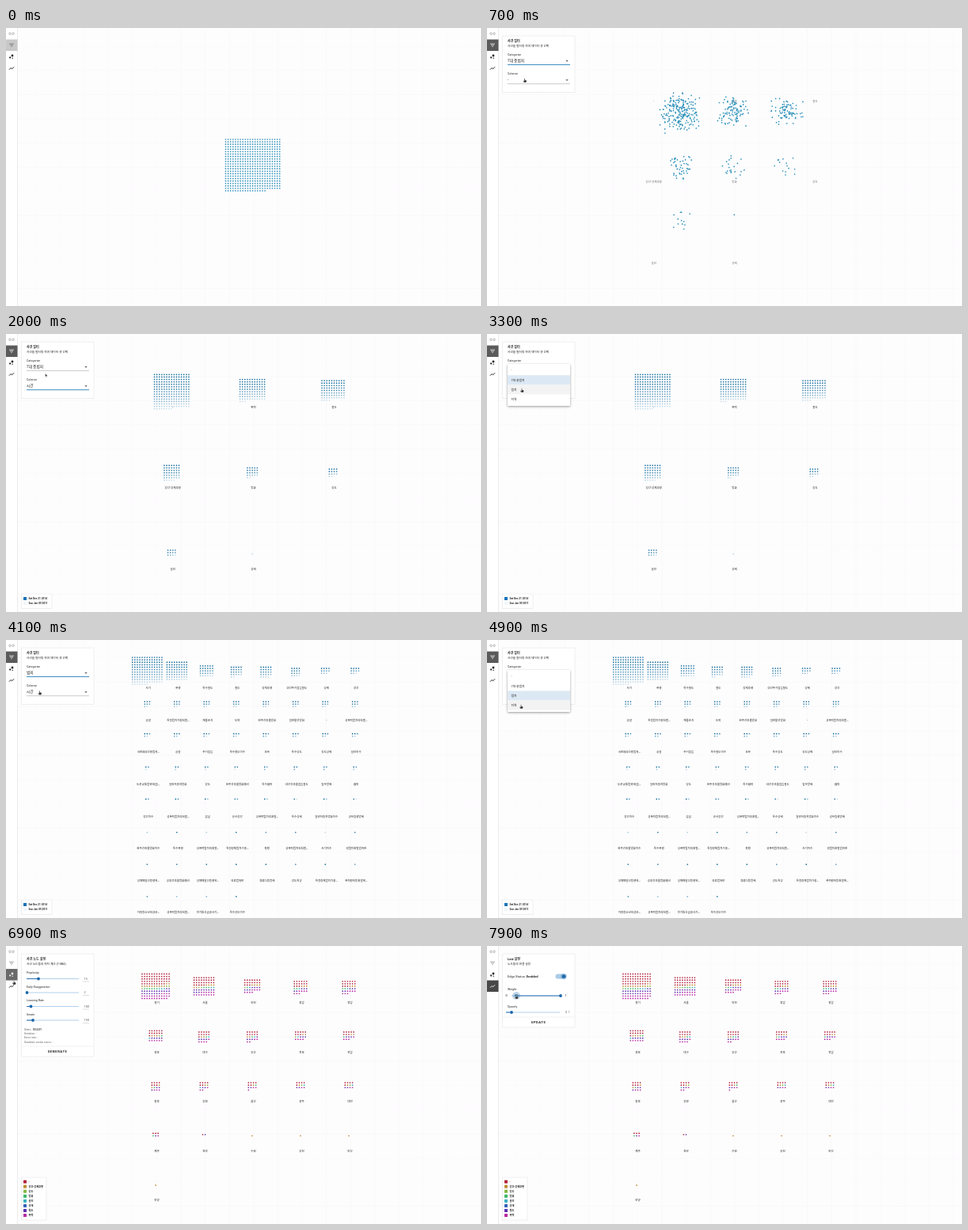
Recreate the animation shown at these times as an HTML page. Size 600x352 px, loop 8 s.

```html
<!DOCTYPE html>
<html lang="ko">
<head>
<meta charset="utf-8">
<style>
html, body { margin: 0; width: 100%; height: 100%; overflow: hidden; background: #fefdfe; }
svg { display: block; width: 600px; height: 352px; font-family: Roboto, 'Noto Sans CJK KR', 'Noto Sans CJK', sans-serif; }
.menu { filter: drop-shadow(0 1px 1.5px rgba(0,0,0,.4)); }
</style>
</head>
<body>
<svg id="stage" viewBox="0 0 600 352">
  <g id="grid" stroke="#f9f8fa" stroke-width=".7"></g>
  <g id="labels"></g>
  <g id="dots"></g>
  <g id="ui"></g>
  <g id="cursor" stroke="#fff" stroke-width=".35" fill="#333">
    <path id="arrow" d="M0 0V4.2L1 3.3 1.7 4.8 2.5 4.4 1.8 3 3.1 2.9Z"/>
    <path id="hand" d="M-.5 0Q0-.6.5 0V1.7L2.4 2.2Q2.8 3.8 1.9 5H-.8L-2 3Q-1.6 2.2-.5 3Z"/>
  </g>
</svg>
<script>
const LOOP = 8000, STEP = 3.1, BLUE = '#1c68ac', MAJOR = '7대 중범죄';
const $ = id => document.getElementById(id);
const clamp = v => Math.max(0, Math.min(1, v));
const ease = k => k < .5 ? 4 * k ** 3 : 1 - (2 - 2 * k) ** 3 / 2;
const mix = (a, b, k) => a + (b - a) * k;
const latest = (list, t) => list.reduce((found, e) => e[0] <= t ? e : found);
const rgb = hex => [1, 3, 5].map(i => parseInt(hex.slice(i, i + 2), 16));

function random(seed) {
  return () => (seed = (seed * 48271) % 2147483647) / 2147483647;
}

// --- markup helpers ---
const text = (x, y, s, size = 3.7, attrs = '') =>
  `<text x="${x}" y="${y + size * .36}" font-size="${size}" fill="#222" ${attrs}>${s}</text>`;
const rect = (x, y, w, h, fill, attrs = '') =>
  `<rect x="${x}" y="${y}" width="${w}" height="${h}" fill="${fill}" ${attrs}/>`;
const line = (x1, x2, y, color, width = .5) =>
  `<path d="M${x1} ${y}H${x2}" stroke="${color}" stroke-width="${width}"/>`;
const circle = (x, y, r, fill, attrs = '') =>
  `<circle cx="${x}" cy="${y}" r="${r}" fill="${fill}" ${attrs}/>`;
const BOLD = 'font-weight="700"', MIDDLE = 'text-anchor="middle"', GREY = 'style="fill:#666"';
const card = (y, h, w = 91.5) => rect(19.5, y, w, h, '#fff', 'stroke="#e8e8ea" stroke-width=".7"');

// --- cluster layouts ---
const HUES = ['#b3243c', '#bd8a35', '#84b640', '#3bb765', '#35afc0', '#3560b8', '#5f30b0', '#b52aa2'];
const HUE_NAMES = ['-', '강간·강제추행', '강도', '방화', '살인', '상해', '절도', '폭력'];
const HUE_SHARES = [.44, .534, .56, .602, .626, .628, .796, 1];
const MAJOR_ORDER = [0, 7, 6, 1, 3, 2, 4, 5];

const crimes = `사기,폭행,특수절도,절도,강제추행,야간주거침입절도,상해,강간
공갈,특정범죄가중처벌…,재물손괴,도박,현주건조물방화,일반물건방화,-,성폭력범죄의처벌…
국민체육진흥법위…,공갈,주거침입,특수절도미수,모욕,특수강도,강도상해,살인미수
도로교통법위반(음…,일반자동차방화,강도,현주건조물방화예비,특수협박,야간건조물침입절도,업무방해,협박
강간미수,성폭력범죄의처벌…,감금,유사강간,성폭력범죄의처벌…,특수상해,일반자동차방화미수,공무집행방해
현주건조물방화미수,특수폭행,성폭력범죄의처벌…,특정경제범죄가중…,횡령,성폭력범죄의처벌…,사기미수,경범죄처벌법위반
성매매알선등행위…,공용건조물방화예비,성매매알선등행위…,의료법위반,장례식등방해,강도치상,특정경제범죄가중…,폭력행위등처벌에…
아동청소년의성보…,성폭력범죄의처벌…,전기통신금융사기…,특수강도미수`.split(/[,\n]/);
const crimeCounts = crimes.map((_, i) =>
  i < 8 ? [150, 72, 30, 22, 24, 16, 11, 11][i] : [8, 5, 3, 2, 1, 1, 1][(i >> 3) - 1]);

const regionHead = '경기 서울 인천 충남 경남 경북 대구 부산 ';
const regionsByTime = (regionHead + '전남 전북 충북 강원 울산 대전 광주 제주 천안 부천 안산 수원 안양').split(' ');
const regionsByCrime = (regionHead + '전북 전남 충북 강원 울산 광주 대전 제주 천안 수원 부천 안산 안양').split(' ');
const regionCounts = [131, 72, 39, 33, 33, 30, 24, 22, 19, 18, 16, 14, 13, 12, 12, 6, 2, 1, 1, 1, 1];

function layout(counts, cols, x0, dx, y0, dy, seed) {
  const rnd = random(seed), slots = [];
  const centers = counts.map((_, i) => [x0 + i % cols * dx, y0 + Math.floor(i / cols) * dy]);
  counts.forEach((n, group) => {
    const side = Math.ceil(Math.sqrt(n)), [cx, cy] = centers[group];
    for (let j = 0; j < n; j++) slots.push({
      x: cx + (j % side - (side - 1) / 2) * STEP,
      y: cy + (Math.floor(j / side) - (side - 1) / 2) * STEP,
      group, rank: (j + .5) / n, age: (j + rnd()) / n
    });
  });
  for (let i = slots.length - 1; i > 0; i--) {
    const j = Math.floor(rnd() * (i + 1));
    [slots[i], slots[j]] = [slots[j], slots[i]];
  }
  return { slots, centers };
}

const whole = layout([500], 1, 311.6, 0, 175.1, 0, 11);
const major = layout([218, 102, 84, 47, 22, 14, 12, 1], 3, 209.2, 101.9, 73, 102.7, 23);
const crime = layout(crimeCounts, 8, 178.3, 37.5, 40.6, 40.6, 37);
const region = layout(regionCounts, 5, 189, 61, 52.5, 62.6, 53);

// --- colour rules ---
const NEW = rgb('#17719f'), OLD = rgb('#eef7fb');
const plain = () => rgb('#2b91b9');
const byMajor = s => rgb(HUES[MAJOR_ORDER[s.group]]);
const byShare = s => rgb(HUES[HUE_SHARES.findIndex(share => s.rank < share)]);
const byTime = s => NEW.map((c, i) => mix(c, OLD[i], .85 * s.age ** 2));

const majorNames = MAJOR_ORDER.map(i => HUE_NAMES[i]);
const poses = [
  [0, whole, plain, []],
  [500, major, plain, majorNames],
  [1000, major, byMajor, majorNames],
  [1900, major, byTime, majorNames],
  [3700, crime, byTime, crimes],
  [5080, region, byTime, regionsByTime],
  [6200, region, byShare, regionsByCrime]
].map(([start, place, paint, names]) => {
  const g = document.createElementNS('http://www.w3.org/2000/svg', 'g');
  g.innerHTML = names.map((name, i) => {
    const [x, y] = place.centers[i];
    return text(x + 1.5, y + 19.3 + (place === crime), name, 3.5, MIDDLE + ' font-weight="500"');
  }).join('');
  $('labels').append(g);
  return { start, place, g, length: place === whole ? 1 : 360,
    nodes: place.slots.map(s => [s.x, s.y, ...paint(s)]) };
});

$('dots').innerHTML = circle(0, 0, .85, '#000').repeat(500);
const dots = [...$('dots').children];
let grid = '';
for (let k = 0; k < 20; k++) grid += `<path d="M${37 + k * 30.65} 0V352M15 ${23 + k * 30.65}H600"/>`;
$('grid').innerHTML = grid;

function drawDots(t) {
  const at = poses.findLastIndex(p => p.start <= t);
  const to = poses[at], from = poses[Math.max(0, at - 1)];
  const raw = clamp((t - to.start) / to.length), k = ease(raw);
  const moving = from.place !== to.place;
  const kc = moving ? k : clamp(raw * 4);
  dots.forEach((dot, i) => {
    const a = from.nodes[i], b = to.nodes[i];
    dot.setAttribute('cx', mix(a[0], b[0], k));
    dot.setAttribute('cy', mix(a[1], b[1], k));
    dot.setAttribute('fill', `rgb(${[2, 3, 4].map(c => Math.round(mix(a[c], b[c], kc)))})`);
  });
  poses.forEach(p => p.g.setAttribute('opacity', p === to ? (moving ? k : 1) : 0));
}

// --- cursor: arrival time, x, y ---
const GLIDE = 200;
const stops = [
  [130, 8, 22], [280, 50, 42], [400, 46, 58], [780, 48, 66], [900, 45, 82], [1150, 46, 68],
  [1300, 44.5, 93], [1620, 43, 106], [2000, 49.5, 50], [2200, 51, 44], [3200, 44, 69],
  [4000, 42.5, 64.5], [4600, 46, 43], [4850, 43, 82], [5700, 50, 68], [6080, 44, 83],
  [6650, 8, 37], [6900, 10, 44], [7050, 8, 51], [7400, 96, 38], [7680, 31, 62], [7900, 37, 62]
];

function cursorAt(t) {
  const a = latest(stops, t), b = stops.find(s => s[0] > t) || a;
  const glide = Math.min(GLIDE, b[0] - a[0]) || 1;
  const k = ease(clamp(1 - (b[0] - t) / glide));
  return { x: mix(a[1], b[1], k), y: mix(a[2], b[2], k) };
}

function drawCursor(t) {
  const { x, y } = cursorAt(t), arrow = t > 1950 && t < 2150;
  $('cursor').setAttribute('opacity', t < stops[0][0] ? 0 : 1);
  $('cursor').setAttribute('transform', `translate(${x} ${y})`);
  $('hand').setAttribute('opacity', arrow ? 0 : 1);
  $('arrow').setAttribute('opacity', arrow ? 1 : 0);
}

// --- interface ---
const CATEGORIES = ['-', MAJOR, '범죄', '지역'], COLORS = ['-', MAJOR, '지역', '시간'];
// time, category, colour, focused field, menu open
const form = [
  [0, '-', '-', ''],
  [280, '-', '-', 'category', true],
  [500, MAJOR, '-', 'category'],
  [780, MAJOR, '-', 'color', true],
  [1000, MAJOR, MAJOR, 'color'],
  [1150, MAJOR, MAJOR, 'color', true],
  [1900, MAJOR, '시간', 'color'],
  [2800, MAJOR, '시간', 'category', true],
  [3700, '범죄', '시간', 'category'],
  [4600, '범죄', '시간', 'category', true],
  [5080, '지역', '시간', 'category'],
  [5900, '지역', '시간', 'color', true],
  [6200, '지역', MAJOR, 'color']
];
const panels = [[0, 'none'], [130, 'filter'], [6700, 'nodes'], [7050, 'link']];
const sidebar = [[0, 1, '#c8c8c8'], [130, 1, '#5a5a5a'], [6700, 2, '#6a6a6a'], [7050, 3, '#484848']];

function drawSidebar(t) {
  const [, active, bg] = latest(sidebar, t);
  const ink = ['#aaa', '#999', '#222', '#222'];
  ink[active] = t < 130 ? '#777' : '#eee';
  return rect(0, 0, 14.5, 352, '#fff') + rect(14, 0, .7, 352, '#e2e2e4') +
    rect(0, active * 14.5, 14.5, 14.5, bg) +
    `<g fill="none" stroke-width=".8">
      <path d="M6 5.8H5a1.2 1.2 0 0 0 0 2.6H6M8 5.8H9a1.2 1.2 0 0 1 0 2.6H8M5.3 7.1H8.7" stroke="${ink[0]}"/>
      <path d="M4 20H10M5 21.7H9M6.2 23.4H7.8" stroke="${ink[1]}"/>
      <path d="M4 52.7L6.1 50.5 7.6 51.8 10 49.3" stroke="${ink[3]}" stroke-width="1"/></g>` +
    circle(5.2, 37.4, 1.1, ink[2]) + circle(8, 35, 1.4, ink[2]) + circle(8.2, 38.2, .7, ink[2]);
}

const heading = (title, note) => text(26, 16.8, title, 4, BOLD) + text(26, 22.8, note);

const field = (y, label, value, focused) =>
  text(26, y - 7.7, label, 3.6) + text(26, y, value, 4.7) +
  `<path d="M99.3 ${y - .5}h3.4l-1.7 1.8Z" fill="#555"/>` +
  line(26, 105, y + 5, focused ? '#2880bd' : '#999', focused ? .9 : .5);

function menu(y, options, selected, t) {
  const row = 12.2, hover = Math.floor((cursorAt(t).y - y - 2) / row);
  return `<g class="menu">${rect(26, y, 79, 53, '#fff', 'rx=".8"')}</g>` +
    options.map((name, i) => {
      const top = y + 2 + i * row;
      const bg = name === selected ? '#dce9f5' : i === hover ? '#f3f3f3' : '#fff';
      return rect(26, top, 79, row, bg) + text(30.5, top + row / 2, name, 3.8);
    }).join('');
}

function filterPanel(t) {
  const [, category, color, focus, open] = latest(form, t);
  const onCategory = focus === 'category';
  return card(10, 71.5) + heading('사건 필터', '사건을 필터링 하여 데이터 셋 선택') +
    field(41.5, 'Categorize', category, onCategory) +
    field(65.7, 'Colorize', color, focus === 'color') +
    (!open ? '' : onCategory ? menu(38, CATEGORIES, category, t) : menu(62, COLORS, color, t));
}

const slider = (x1, x2, y, from, to) =>
  line(x1, x2, y, '#a9cbe8', .9) + line(from, to, y, BLUE, .9) + circle(to, y, 1.9, BLUE);
const button = (y, name) =>
  line(20, 111, y - 6.5, '#e6e6e6') + text(65, y, name, 4.2, MIDDLE + ' letter-spacing=".5" ' + BOLD);

function nodesPanel() {
  const rows = [['Perplexity', 41, 15], ['Early Exaggeration', 26.5, 2], ['Learning Rate', 31.5, 180], ['Iterate', 34, 150]];
  const status = [`State : <tspan ${BOLD}>READY</tspan>`, 'Iteration: -', 'Error rate: -', 'Gradient vector norm: -'];
  return card(10, 130) + heading('사건 노드 설정', '사건 노드들의 위치 계산 (T-SNE)') +
    rows.map(([name, x, value], i) => {
      const y = 41.5 + i * 17.5;
      return text(26, y - 7.5, name, 3.6) + slider(26, 92, y, 26, x) +
        text(98.5, y, value, 4, GREY) + line(97, 105, y + 3.5, '#aaa', .4);
    }).join('') +
    status.map((s, i) => text(23, 105.5 + i * 5.3, s, 3.6, GREY)).join('') +
    button(133.5, 'GENERATE');
}

function linkPanel(t) {
  const on = clamp((t - 7420) / 120), weight = cursorAt(Math.max(t, 7680)).x;
  const knob = mix(89.5, 97, on), grab = clamp((t - 7650) / 100);
  return card(10, 93) + heading('Link 설정', '노드들의 연결 설정') +
    text(26, 38.5, `Edge Status: <tspan ${BOLD}>${on ? 'Enabled' : 'Disabled'}</tspan>`, 4.1) +
    rect(86.5, 35.5, 13.5, 6, on ? '#a9cbe8' : '#ccc', 'rx="3"') +
    circle(knob, 38.5, 4, BLUE, `opacity="${.2 * on}"`) +
    circle(knob, 38.5, 2.5, on ? BLUE : '#f5f5f5', 'stroke="#8aabc8" stroke-width=".4"') +
    text(26, 55, 'Weight', 3.6) + text(23.5, 63, '0', 3.8) + text(98.5, 63, '1', 3.8) +
    slider(31, 93, 63, weight, 93) + circle(weight, 63, 5, BLUE, `opacity="${.28 * grab}"`) + circle(weight, 63, 2, BLUE) +
    text(26, 76.5, 'Opacity', 3.6) + slider(24, 92, 84, 24, 31) + text(99, 84, '0.1', 3.8, GREY) +
    button(96.5, 'UPDATE');
}

const legendRow = (y, color, name) => rect(22, y - 2, 4, 4, color) + text(28.5, y, name, 3.2, BOLD);

function drawLegend(t) {
  const color = latest(form, t)[2];
  if (color === '-') return '';
  if (color === '시간') return card(329, 18.5, 38.5) +
    legendRow(335, '#1c72b8', 'Sat Dec 21 2014') + legendRow(341.2, '#f0f7fa', 'Sun Jan 09 2011');
  return card(293, 54, 31.5) + HUES.map((c, i) => legendRow(298.5 + i * 6.08, c, HUE_NAMES[i])).join('');
}

const panelView = { none: () => '', filter: filterPanel, nodes: nodesPanel, link: linkPanel };
let shown = '';
function drawInterface(t) {
  const markup = drawSidebar(t) + panelView[latest(panels, t)[1]](t) + drawLegend(t);
  if (markup !== shown) $('ui').innerHTML = shown = markup;
}

function draw(t) {
  drawDots(t);
  drawInterface(t);
  drawCursor(t);
}

const began = performance.now();
function tick() {
  draw((performance.now() - began) % LOOP);
  requestAnimationFrame(tick);
}
tick();
</script>
</body>
</html>
```
